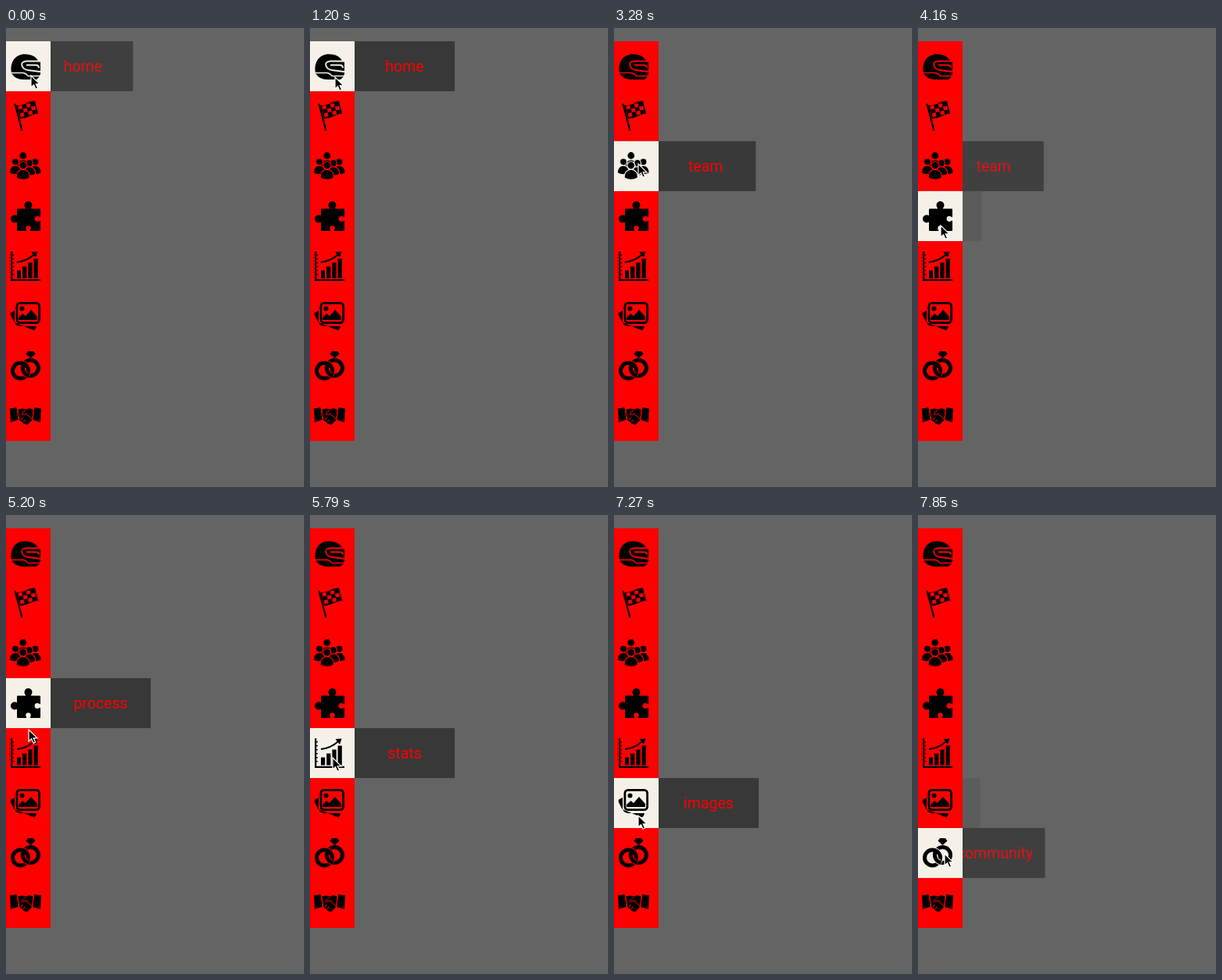
An HTML page that plays this animation: 381x588 px, repeating every 8 s.

```html
<!DOCTYPE html>
<html lang="en">
<head>
<meta charset="utf-8">
<style>
  html, body { margin: 0; width: 100%; height: 100%; overflow: hidden; background: #646464; }
  svg { display: block; }
  text { font: 19.5px Roboto, sans-serif; fill: #f00; text-anchor: middle; }
  /* each row's colour is shared with the cut-outs of its icon */
  .row { color: #f00; }
  .row.on { color: #f5f1e8; }
  .cut { fill: currentColor; }
  .line { fill: none; stroke: #000; }
  .gap { fill: none; stroke: currentColor; }
  .halo { stroke: currentColor; stroke-width: 1.2; }
</style>
</head>
<body>
<svg id="stage" width="381" height="588" viewBox="0 0 381 588"></svg>
<script>
const LOOP = 8000, SLIDE = 500, TOP = 17, ROW = 64, BAR = 57, LABEL = 128;
const names = ['home', 'about', 'team', 'process', 'stats', 'images', 'community'];
const starts = [-260, 1690, 2890, 4085, 5210, 6530, 7590];

// pointer: time, x, y
const track = [
  [0, 32, 61], [1050, 32, 61], [1200, 32, 63], [1690, 33, 82], [1900, 33, 105],
  [2390, 33, 107], [2890, 32, 146], [3100, 31, 172], [3570, 30, 176],
  [4080, 29, 209], [4160, 29, 253], [4900, 29, 254], [5200, 29, 275],
  [5450, 29, 310], [5940, 29, 312], [6520, 29, 337], [6670, 29, 375],
  [7120, 30, 377], [7580, 33, 402], [7750, 34, 434], [LOOP, 34, 434]
];

const path = (d, attrs = '') => `<path d="${d}" ${attrs}/>`;
const circle = (x, y, r, attrs = '') => `<circle cx="${x}" cy="${y}" r="${r}" ${attrs}/>`;
const rect = (x, y, w, h, attrs = '') =>
  `<rect x="${x}" y="${y}" width="${w}" height="${h}" ${attrs}/>`;
const line = (d, width, kind = 'line') => path(d, `class="${kind}" stroke-width="${width}"`);

const person = (x, y, r) =>
  path(`M${x - 1.7 * r} ${y + 3.2 * r}C${x - 1.9 * r} ${y + .3 * r} ${x + 1.9 * r} ${y + .3 * r} ${x + 1.7 * r} ${y + 3.2 * r}Q${x} ${y + 4.1 * r} ${x - 1.7 * r} ${y + 3.2 * r}Z`, 'class="halo"') +
  circle(x, y, r, 'class="halo"');

function flag() {
  let cells = '';
  for (let i = 0; i < 12; i++) {
    const col = i % 4, row = i >> 2;
    if ((col + row) % 2 == 0) cells += rect(col * 5.2 + 1.4, row * 4.8 + 1.3, 5, 4.6, 'class="cut"');
  }
  return line('M5.5 3L14.5 37.5', 2.2) +
    `<g transform="matrix(1 -.24 .25 1 7.5 5)">${path('M0 0Q6 2 11.5 .5T23.5 0V16.5Q17 15.5 12 17T0 17Z')}${cells}</g>`;
}

function chart() {
  let art = line('M1.2 0V36.8H38', 2.2);
  for (let i = 0; i < 6; i++) art += rect(2, 4 + i * 5, 2, 1.3);
  [10, 15, 20, 25].forEach((h, i) => art += rect(8 + i * 7.2, 34.5 - h, 5.2, h));
  return art + line('M8 14Q21 12.5 30 4', 2) + path('M26.5 1L34.5 .5L32 8Z');
}

const icons = [
  // helmet
  path('M.5 24C0 10 9 3.5 18 3.5C27 3.5 33 7 35.5 13H38V29Q37 33 33 36H16Q6 36 1 28Z') +
    path('M38 12.5H20Q12.5 13 14.5 18.5Q16 23 22 24L38 26', 'class="gap" stroke-width="1.8"') +
    line('M20 17.5H33Q36 18 36 21', 2, 'gap') +
    line('M0 27.5H16Q20 28 22 31.5H38', 1.3, 'gap'),
  flag(),
  // crowd
  person(15.8, 5.5, 5) + person(6, 13.5, 4.5) + person(31.5, 13.5, 4.5) +
    person(24, 15, 4.5) + person(15.8, 18, 5),
  // puzzle piece
  rect(8, 9.5, 30, 28.5, 'rx="1"') + circle(22.5, 5, 5) + rect(19, 6, 7, 6) +
    circle(5, 22.5, 5) + rect(5, 18.7, 5, 7.6) +
    circle(34, 22.5, 3.4, 'class="cut"') + rect(34, 20.2, 5, 4.6, 'class="cut"') +
    circle(22.5, 34.5, 3.2, 'class="cut"') + rect(20.2, 35, 4.6, 4, 'class="cut"'),
  chart(),
  // pictures
  path('M5 12L1 14Q-1 15 0 18L3 24Q4 27 7 28L29 37Q32 37.5 33 32H12Q5 31 5 25Z') +
    rect(7.9, 2.4, 28.7, 25.2, 'rx="4" class="line" stroke-width="2.8"') +
    circle(14.5, 9.5, 3) + path('M10 24V21L15.5 16L19 19L26 11L34 20V24H10Z'),
  // rings
  circle(25.5, 21.5, 10, 'class="line" stroke-width="5"') +
    circle(12.5, 25, 10, 'class="gap" stroke-width="7"') +
    circle(12.5, 25, 10, 'class="line" stroke-width="5"') +
    line('M15.5 21.5A10 10 0 0 0 22 30.9', 7, 'gap') +
    line('M17 16.2A10 10 0 0 0 23.5 31.3', 5) +
    path('M22 0H29L31.5 3.5L25.5 9L19.5 3.5Z'),
  // handshake
  path('M-1 9.5L7.5 8L9.5 24L0 27Z') + path('M39 9.5L30.5 8L28.5 24L38 27Z') +
    path('M8.5 10.5L15 9.5L20 10.5L24 9L29.5 11L28 23.5L22 29.5Q20 31 17 29L10 23Z') +
    line('M9 8L10.8 25M29 8L27.2 25', .9, 'gap') +
    line('M19 11.5L14 16Q15 19 20 16L27 23M13 24L16 21M16 27L19 24', 1, 'gap')
];

const stage = document.getElementById('stage');
stage.innerHTML =
  names.map((name, i) => `<g class="label">${rect(BAR, TOP + i * ROW, LABEL, ROW, 'fill="#383838"')}
    <text x="${BAR + LABEL / 2}" y="${TOP + i * ROW + 39}">${name}</text></g>`).join('') +
  icons.map((art, i) => `<g class="row" transform="translate(0 ${TOP + i * ROW})">
    ${rect(0, 0, BAR, ROW, 'class="cut"')}<g transform="translate(6 13)">${art}</g></g>`).join('') +
  path('M0 0V15L3.5 11.8L6 17.2L8.6 16L6.2 10.8H11Z', 'id="pointer" stroke="#fff" stroke-width="1.2"');

const labels = stage.querySelectorAll('.label');
const rows = stage.querySelectorAll('.row');
const pointer = document.getElementById('pointer');

// cubic-bezier(.25, .1, .25, 1)
function ease(x) {
  if (x <= 0) return 0;
  if (x >= 1) return 1;
  let lo = 0, hi = 1;
  for (let i = 0; i < 20; i++) {
    const s = (lo + hi) / 2;
    if (.75 * s * (1 - s) + s ** 3 < x) lo = s; else hi = s;
  }
  return .3 * lo * (1 - lo) ** 2 + 3 * lo * lo * (1 - lo) + lo ** 3;
}

function draw(t) {
  const shown = i => i < starts.length ? ease((t - starts[i]) / SLIDE) : 0;
  labels.forEach((label, i) => {
    const p = shown(i) - shown(i + 1);
    label.setAttribute('opacity', p);
    label.setAttribute('transform', `translate(${(p - 1) * LABEL} 0)`);
  });

  const active = starts.filter(s => s <= t).length - 1;
  rows.forEach((row, i) => row.classList.toggle('on', i === active));

  const next = track.findIndex(k => k[0] > t);
  const [t0, x0, y0] = track[next - 1], [t1, x1, y1] = track[next];
  const f = (t - t0) / (t1 - t0);
  pointer.setAttribute('transform',
    `translate(${Math.round(x0 + (x1 - x0) * f)} ${Math.round(y0 + (y1 - y0) * f)})`);
}

const begin = performance.now();
function tick() {
  draw((performance.now() - begin) % LOOP);
  requestAnimationFrame(tick);
}
tick();
</script>
</body>
</html>
```
